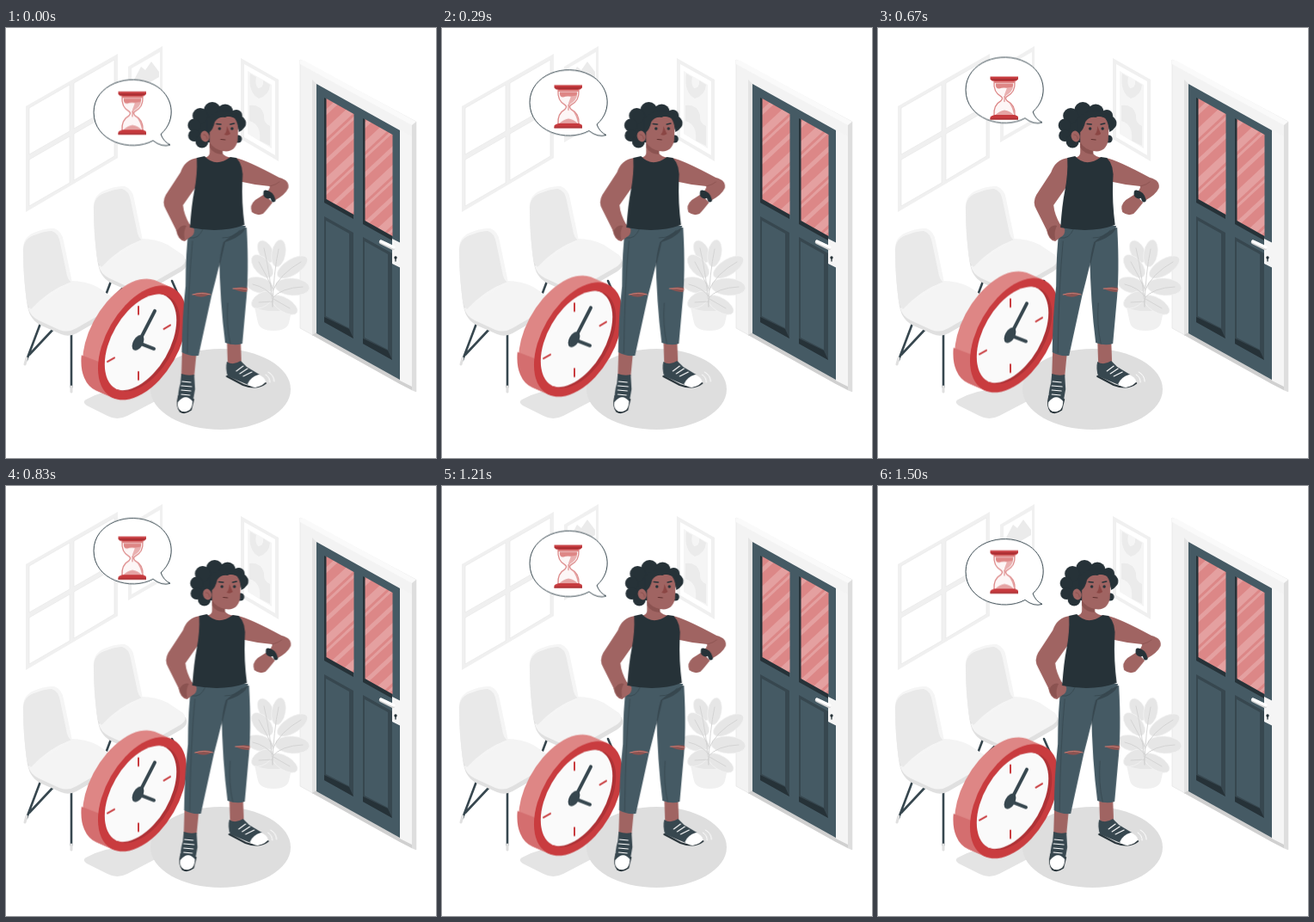
Recreate the animation shown at these times as an HTML page. Size 500 by 500 pixels, loop 1540 ms.

```html
<!DOCTYPE html>
<html lang="en">
<head>
<meta charset="utf-8">
<title>Waiting</title>
<style>
html, body { margin: 0; width: 100%; height: 100%; overflow: hidden; background: #fff; }
svg { display: block; width: 100vw; height: 100vh; }
.loop { animation: 1540ms linear -62ms infinite; }
#bubble { --rise: -30px; animation-name: float; }
#hourglass { --rise: -20px; animation-name: float; }
#clock { --rise: -10px; animation-name: float; }
#person { animation-name: shake; }
@keyframes float {
  0%, 100% { transform: translateY(0); }
  50% { transform: translateY(var(--rise)); }
}
@keyframes shake {
  0%, 100% { transform: translateX(0); }
  10%, 90% { transform: translateX(-1px); }
  20%, 80% { transform: translateX(2px); }
  30%, 50%, 70% { transform: translateX(-4px); }
  40%, 60% { transform: translateX(4px); }
}
.line { fill: none; stroke-linecap: round; stroke-linejoin: round; }
.skin { fill: #a06462; }
.shade { fill: #8b5351; }
.denim { fill: #455a64; }
.dark { fill: #263238; }
</style>
</head>
<body>
<svg viewBox="0 0 500 500">
<defs>
  <pattern id="stripes" width="42" height="42" patternUnits="userSpaceOnUse" patternTransform="rotate(-43)">
    <rect width="42" height="42" fill="#dc8787"/>
    <rect y="3" width="42" height="9" fill="#e4a0a0"/>
    <rect y="15" width="42" height="3" fill="#e4a0a0"/>
    <rect y="29" width="42" height="5" fill="#e4a0a0"/>
  </pattern>
  <clipPath id="dial"><circle r="50.500"/></clipPath>
  <g id="chair">
    <g class="line" stroke="#37474f" stroke-width="2.6">
      <path d="M41 341L24 386M57 348L27 380M76 355V418M111 343L122 368"/>
      <path stroke="#e0e0e0" stroke-width="3" d="M24 384L22 391M76 417V423"/>
    </g>
    <path fill="#e0e0e0" d="M20 262C22 300 23 325 29 335Q33 342 41 346L64 356Q73 360 82 355L122 332Q131 326 127 318L70 300Z"/>
    <path fill="#f4f4f4" d="M26 326Q46 305 76 294Q92 294 106 301L124 313Q130 320 122 326L82 349Q72 355 62 351L38 340Q28 335 26 326Z"/>
    <path fill="#f5f5f5" d="M20 262Q18 246 30 239Q45 232 56 233Q65 236 67 248L76 291Q78 297 70 300L34 322Q27 328 25 320Q20 295 20 262Z"/>
    <path fill="#e9e9e9" d="M20 262Q19 247 30 242Q44 236 53 236Q61 238 63 250L71 288Q73 295 76 295Q49 305 29 327Q25 324 24 316Q20 290 20 262Z"/>
  </g>
</defs>

<g id="room">
  <path fill="#f0f0f0" d="M23 91L130 30V151L23 214Z"/>
  <path fill="#fff" stroke="#e9e9e9" stroke-width=".7" d="M27 93L74 66V120L27 147ZM27 153L74 126V180L27 207ZM79 64L126 37V90L79 117ZM79 123L126 96V149L79 177Z"/>
  <path fill="#f0f0f0" d="M142 45L182 21V110L142 133Z"/>
  <path fill="#fff" d="M146 47L179 28V107L146 126Z"/>
  <path fill="#ebebeb" d="M149 60L157 45L162 49L169 39L178 51V57L149 74Z"/>
  <path fill="#f0f0f0" d="M273 35L317 60V155L273 129Z"/>
  <path fill="#fff" d="M277 42L313 62V148L277 127Z"/>
  <path fill="#f5f5f5" d="M281 50L309 66V140L281 123Z"/>
  <path fill="#ebebeb" d="M284 53Q281 75 294 82Q306 78 307 66L299 61Q300 70 293 70Q289 65 291 57ZM283 90Q296 88 300 101Q299 111 307 114V137L295 131Q297 112 283 108Z"/>
</g>

<g id="door">
  <path fill="#f3f3f3" stroke="#e4e4e4" stroke-width=".7" d="M342 37L477 109V423L472 421L342 349Z"/>
  <path fill="#fafafa" d="M342 37L347 38L477 109L472 113L342 42Z"/>
  <path fill="#dedede" d="M472 113L477 109V423L472 421Z"/>
  <path fill="#e4e4e4" d="M356 60L361 65V356L356 358Z"/>
  <path fill="#d0d0d0" d="M356 357L361 354L458 408L472 416V421L458 414Z"/>
  <path fill="#f5f5f5" d="M458 118L472 126V417L458 410Z"/>
  <path class="denim" d="M361 65L458 119V409L361 355Z"/>
  <path class="dark" d="M370 81L404 100V222L370 203ZM415 105L449 124V247L415 228Z"/>
  <path fill="url(#stripes)" d="M372.500 82L404.500 100V217L372.500 199ZM417.500 106L449.500 124V242L417.500 224Z"/>
  <path fill="#37474f" d="M370 219L404 238V361L370 342ZM415 243L449 262V386L415 367Z"/>
  <path class="dark" d="M370 336L399 350L404 361L370 342ZM415 361L444 375L449 386L415 367Z"/>
  <path class="denim" d="M372 224L399 239V349L372 335ZM417 248L444 263V374L417 360Z"/>
  <path fill="#f5f5f5" d="M449 245L459 250V279L449 274Z"/>
  <path class="line" stroke="#d6d6d6" stroke-width="4.500" d="M436 249L450 256"/>
  <path class="line" stroke="#fff" stroke-width="3.500" d="M436 248L451 255"/>
  <circle cx="453" cy="267" r="1.7" class="dark"/>
  <path class="line" stroke="#263238" stroke-width="1.3" d="M453 268V271"/>
</g>

<use href="#chair" x="82" y="-49"/>
<use href="#chair"/>

<g id="plant">
  <path fill="#f0f0f0" d="M288 320H334L329 343Q326 352 311 352Q296 352 293 343Z"/>
  <ellipse cx="311" cy="321" rx="23" ry="8" fill="#e6e6e6"/>
  <g fill="#e6e6e6" stroke="#f4f4f4" stroke-width=".7">
    <ellipse cx="302" cy="260" rx="8" ry="14" transform="rotate(-28 302 260)"/>
    <ellipse cx="317" cy="262" rx="8" ry="16" transform="rotate(10 317 262)"/>
    <ellipse cx="298" cy="277" rx="9" ry="16" transform="rotate(-42 298 277)"/>
    <ellipse cx="333" cy="278" rx="9" ry="20" transform="rotate(58 333 278)"/>
    <ellipse cx="333" cy="301" rx="10" ry="20" transform="rotate(94 333 301)"/>
    <ellipse cx="295" cy="299" rx="9" ry="16" transform="rotate(-76 295 299)"/>
    <ellipse cx="298" cy="316" rx="8" ry="14" transform="rotate(58 298 316)"/>
    <ellipse cx="324" cy="322" rx="8" ry="17" transform="rotate(-58 324 322)"/>
  </g>
  <path class="line" stroke="#d2d2d2" stroke-width=".9" d="M310 324Q308 290 300 256M310 324Q311 285 317 257M310 303Q303 288 294 272M310 306Q318 286 343 272M310 314Q320 302 345 301M310 312Q303 302 287 298M310 318L294 319M311 315L330 326"/>
</g>

<path fill="#e4e4e4" d="M93 432Q115 420 140 420L195 398Q205 415 185 428L141 451Q129 457 118 451L94 439Q88 435 93 432Z"/>
<ellipse cx="249.500" cy="420" rx="81.500" ry="47" fill="#dedede"/>

<g id="bubble" class="loop">
  <path transform="translate(0 2.400)" fill="#fff" stroke="#37474f" d="M180 123.500C200 106 194 77 172 66C143 51 102 66 102 98C102 132 145 145 171 131Q181 139 191 136Q183 132 180 123.500Z"/>
</g>

<g id="hourglass" class="loop">
  <g transform="translate(0 1.600)">
    <path fill="#fdf6f6" stroke="#dc8787" stroke-width="1.300" d="M135 80Q134 92 143 97Q146 99 143 102Q134 107 135 119H159Q160 107 150 102Q147 99 150 97Q160 92 159 80Z"/>
    <path fill="#de8685" d="M137 82H157Q158 88 153 88Q146 86 141 88Q136 88 137 82Z"/>
    <path fill="#e9b0b0" d="M150 87L157 86Q156 92 149 96L147 100V95Z"/>
    <path class="line" stroke="#e09393" stroke-width="1.200" d="M147 97V103"/>
    <path fill="#e5a3a3" d="M136 119Q141 114 147 113Q154 114 158 119ZM152 104Q160 109 158 118Q156 109 152 104Z"/>
    <path fill="#c63a3e" d="M130.500 74H163V77Q161 79.500 158 79.500H136Q132 79.500 130.500 77ZM136 118.500H158Q162 119 163 121V124H130.500V121Q132 119 136 118.500Z"/>
    <path fill="#de8685" d="M135 79.500H159V81.500H135Z"/>
    <path fill="#a92f33" d="M130.500 76.500H163L160 78.500H133ZM130.500 122.500H163V124H130.500Z"/>
  </g>
</g>

<g id="clock" class="loop">
  <g transform="translate(0 .8)">
    <g transform="matrix(.866 -.5 0 1 158.500 366)">
      <path fill="#de8685" d="M39.200 -44.700l-22.500 -19.750A59.500 59.500 0 0 0 -61.700 24.950L-39.200 44.700Z"/>
      <path fill="#d46e6f" d="M-81.700 -26.400A59.500 59.500 0 0 0 -61.700 24.950L-39.200 44.700L-58.900 -7.400Z"/>
      <circle r="59.500" fill="#c93c3f"/>
      <circle r="50.500" fill="#ae3236"/>
      <circle cx="-4.600" cy="-3.300" r="50.500" fill="#fafafa" clip-path="url(#dial)"/>
    </g>
    <path class="line" stroke="#c93c3f" stroke-width="2" d="M154 324V333M154 400V409M183.500 350L191 345.500M118 388L126 383.500"/>
    <g class="line" stroke="#37474f" stroke-width="4">
      <path d="M154 366L173 329"/>
      <path d="M154 366L172 373"/>
    </g>
    <circle r="8" transform="matrix(.866 -.5 0 1 153.500 366)" fill="#37474f"/>
  </g>
</g>

<g id="person" class="loop">
  <g transform="translate(.2 0)">
    <path class="line" stroke="#fff" stroke-width="1" d="M302 403Q307 406 307 412M305 400Q312 404 312 411"/>

    <g id="legs">
      <path class="skin" d="M205 374H222L219 405H204ZM257 362H273L274 391H258Z"/>
      <path class="denim" d="M249 240L280 232Q283 285 279 322L275 367Q266 370 255 366Q249 320 248 262Z"/>
      <path class="denim" d="M213 230H279Q276 243 254 249Q248 278 239 312L224 381Q213 382 204.500 377Q205 335 209 300Q209 260 213 230Z"/>
      <path fill="#37474f" d="M279 232Q263 240 253 249Q249 262 248 279Q252 262 255 249Q270 244 276 237Z"/>
      <path class="line" stroke="#37474f" stroke-width=".8" d="M214 244Q224 246 229 234M252 244Q266 244 272 235M217 248Q212 300 211 378M258 320Q256 345 261 367"/>
      <path class="shade" d="M217 310Q227 305 238 309Q228 316 217 310ZM264 303Q273 300 281 302L280 307Q271 307 264 303Z"/>
      <path class="line" stroke="#c97f78" stroke-width="1" d="M217 310Q227 307 238 310M264 303Q273 302 281 304"/>
    </g>

    <g id="shoes">
      <path class="line" stroke="#263238" stroke-width="2" d="M201 428Q198 440 203 446Q208 449 215 444L218 432M257 405L276 415Q292 421 302 413"/>
      <path fill="#37474f" d="M204 402Q212 405 219 403L220 420L217 437Q208 428 200 437Q200 422 203 413Z"/>
      <path fill="#fff" d="M200 435Q209 424 217 434Q217 443 212 445Q207 448 202 444Q199 441 200 435Z"/>
      <path fill="#37474f" d="M257 388Q264 393 273 387L280 394L295 403L282 415L258 405Q255 396 257 388Z"/>
      <path fill="#fff" d="M281 414Q284 406 294 403Q301 406 302 411Q300 416 290 418Q284 417 281 414Z"/>
      <path class="line" stroke="#fff" stroke-width="1.100" d="M205 411L215 412M204 416L216 417M204 421L215 422M204 426L214 427M268 399L276 393M272 402L281 396M276 405L286 400"/>
    </g>

    <g id="arms">
      <path class="skin" d="M223 151Q208 153 203 168L186 194Q181 203 186 211L199 237L214 229Q207 217 206 206L220 186L228 170Z"/>
      <path class="skin" d="M198 235Q200 227 207 226Q215 227 219 234Q220 241 213 244L208 248Q200 247 198 235Z"/>
      <path class="shade" d="M199 236Q204 228 210 230Q206 236 208 246Q201 246 199 236Z"/>
      <path class="skin" d="M262 151H267Q281 154 318 174Q330 177 328.500 186Q325 194 312 201L302 193Q307 187 307 184Q291 183 275 179L266 175Z"/>
      <path class="line" stroke="#8b5351" stroke-width=".8" d="M307 184Q315 182 318 179"/>
      <path class="skin" d="M301 193L290 200Q283 206 286 214Q292 219 299 216Q303 212 310 203Z"/>
      <path class="line" stroke="#263238" stroke-width="5" d="M302 191Q309 192 311 200"/>
      <ellipse cx="304" cy="194" rx="5" ry="4" transform="rotate(40 304 194)" class="dark"/>
    </g>

    <path class="skin" d="M237 132H252V146Q255 150 263 151L246 164L230 151Q237 150 237 145Z"/>
    <path class="dark" d="M222 151L231 149Q244 163 261 150L268 151Q277 160 275 178Q274 202 277.500 229Q250 239 214 232Q216 205 219 190Q223 170 222 151Z"/>

    <g id="head">
      <g class="dark">
        <ellipse cx="244" cy="113" rx="27" ry="21"/>
        <circle cx="240" cy="96" r="10"/>
        <circle cx="255" cy="98" r="9.500"/>
        <circle cx="226" cy="102" r="9"/>
        <circle cx="219" cy="113" r="7.500"/>
        <circle cx="219" cy="125" r="7"/>
        <circle cx="228" cy="132" r="7.500"/>
        <circle cx="268" cy="102" r="7"/>
        <circle cx="270" cy="129" r="4.500"/>
      </g>
      <path class="skin" d="M237 110Q249 98 269 105Q271 118 269.500 131Q267 143 256 143.500Q244 143 237 136Z"/>
      <path class="shade" d="M237 133Q242 141 252 143V147Q241 146 237 139Z"/>
      <path class="dark" d="M234 121V106Q241 97 255 96Q270 96 277 105Q281 110 278 115Q275 119 271 121Q270 110 266 105Q260 101 255 104Q247 103 243 109Q241 118 237 121Z"/>
      <ellipse cx="231.500" cy="126" rx="5" ry="6.500" transform="rotate(-15 231.500 126)" class="skin"/>
      <path class="line" stroke="#8b5351" stroke-width="1" d="M230 124Q234 124 234 129"/>
      <path fill="#8b4644" d="M257 114L261 123Q258 126 254 124Q257 121 257 114Z"/>
      <path class="line" stroke="#263238" stroke-width="1.600" d="M245 111.500L250 112M261 112L265.500 111"/>
      <circle cx="248.500" cy="117" r="1.700" class="dark"/>
      <circle cx="263" cy="117" r="1.700" class="dark"/>
      <path class="line" stroke="#5e302f" stroke-width="1.100" d="M250 129.500L255 130"/>
    </g>
  </g>
</g>
</svg>
</body>
</html>
```
